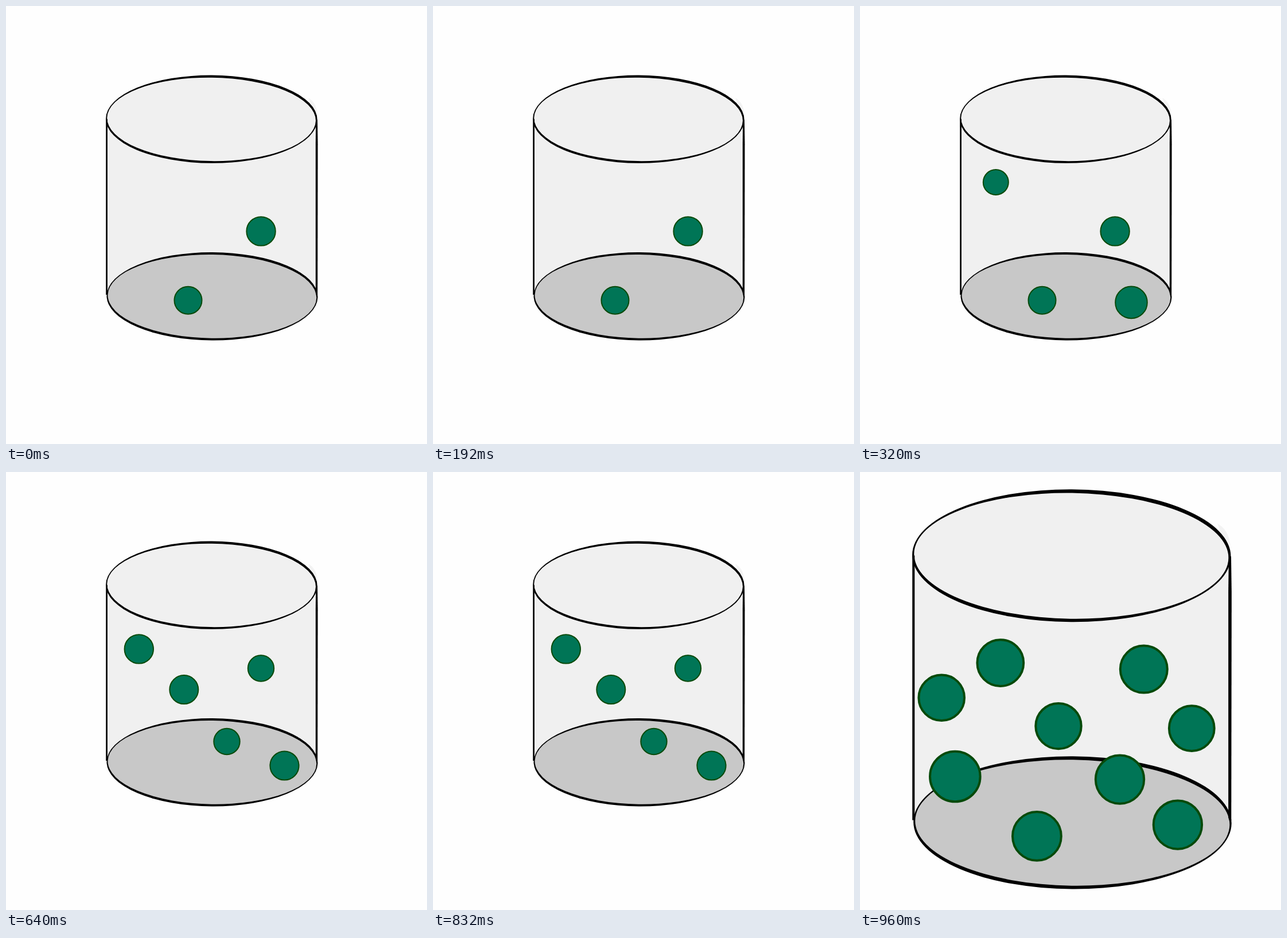
Animation of 734x763 px, one loop 1280 ms. Source, as an HTML page:

```html
<!DOCTYPE html>
<html lang="en">
<head>
<meta charset="utf-8">
<title>Particles in a cylinder</title>
<style>
  html, body { margin: 0; width: 100%; height: 100%; overflow: hidden; background: #fefefe; }
  svg { display: block; width: 734px; height: 763px; }
  .dots { fill: #007556; stroke: #074a0a; stroke-width: 2; }
  .large { stroke-width: 4; }

  /* Each scene holds for a quarter of the loop, with hard cuts. */
  .scene { visibility: hidden; animation: quarter 1280ms step-end infinite; }
  .half { animation-name: half; }
  .most { animation-name: most; }
  .second { animation-delay: -960ms; }
  .third { animation-delay: -640ms; }
  .fourth { animation-delay: -320ms; }
  @keyframes quarter { 0% { visibility: visible } 25%, 100% { visibility: hidden } }
  @keyframes half { 0% { visibility: visible } 50%, 100% { visibility: hidden } }
  @keyframes most { 0% { visibility: visible } 75%, 100% { visibility: hidden } }
</style>
</head>
<body>
<svg viewBox="0 0 734 763">
  <defs>
    <g id="cylinder">
      <path d="M527 160Q540 167 542 184L535 180Z" fill="#f3f3f3"/>
      <path d="M175.5 197H541.5V505H175.5Z" fill="#f0f0f0"/>
      <!-- An inner ellipse tilted inside the black one gives the uneven pen line. -->
      <ellipse cx="359.5" cy="505.8" rx="184" ry="76.7" transform="rotate(.3 359.5 505.8)"/>
      <ellipse cx="359.4" cy="505.9" rx="181.9" ry="72.8" transform="rotate(.8 359.4 505.9)" fill="#c8c8c8"/>
      <ellipse cx="358.4" cy="197.2" rx="184.3" ry="76.6" transform="rotate(.3 358.4 197.2)"/>
      <ellipse cx="358.1" cy="197.4" rx="181.9" ry="72.7" transform="rotate(.8 358.1 197.4)" fill="#f0f0f0"/>
      <path d="M174.2 197H176.9V503H174.2Z"/>
      <path d="M540.3 198H543L543.6 240 543.2 503 541.5 505 539.8 500V240Z"/>
    </g>
  </defs>

  <g class="scene most"><use href="#cylinder"/></g>

  <g class="scene half dots">
    <circle cx="444.6" cy="392.4" r="25.2"/>
    <circle cx="317.5" cy="512.7" r="24"/>
  </g>

  <g class="scene second dots">
    <circle cx="236.8" cy="307" r="22"/>
    <circle cx="473" cy="516.4" r="27.8"/>
  </g>

  <g class="scene third dots">
    <circle cx="231.8" cy="308.4" r="25.2"/>
    <circle cx="310.3" cy="379.1" r="25"/>
    <circle cx="444.5" cy="342" r="22.7"/>
    <circle cx="385" cy="469.5" r="22.7"/>
    <circle cx="485.5" cy="511.5" r="25.1"/>
  </g>

  <g class="scene fourth">
    <use href="#cylinder" transform="translate(-171.3 -151.4) scale(1.507)"/>
    <g class="dots large">
      <circle cx="244.8" cy="332.6" r="40.4"/>
      <circle cx="494.8" cy="343.6" r="41"/>
      <circle cx="142.2" cy="393.2" r="39.8"/>
      <circle cx="346" cy="442.6" r="39.7"/>
      <circle cx="578.3" cy="446.6" r="39.4"/>
      <circle cx="165.8" cy="530.5" r="43.8"/>
      <circle cx="453" cy="535.6" r="42.2"/>
      <circle cx="308.4" cy="634.4" r="42.4"/>
      <circle cx="553.9" cy="614.6" r="42.2"/>
    </g>
  </g>
</svg>
</body>
</html>
```
